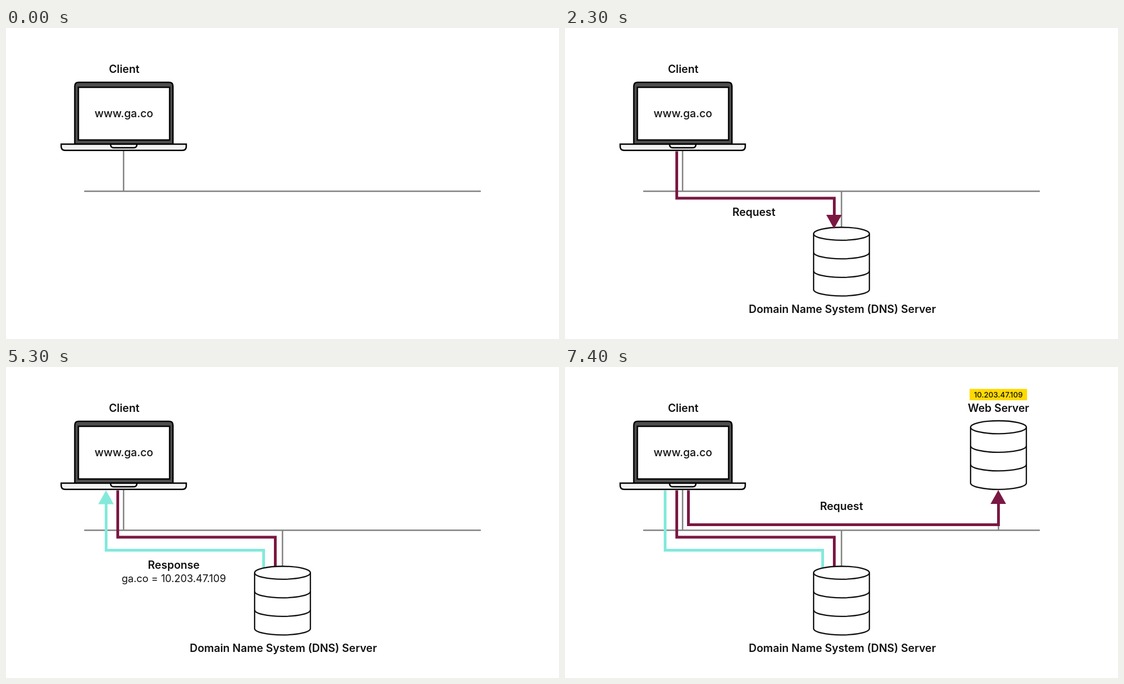
An HTML page that plays this animation: 997 by 561 pixels, repeating every 8 s.

```html
<!DOCTYPE html>
<html lang="en">
<head>
<meta charset="utf-8">
<title>DNS lookup</title>
<style>
  html, body { margin: 0; width: 100%; height: 100%; overflow: hidden; background: #fff; }
  svg { display: block; width: 997px; height: 561px; }

  text { font: 500 19.6px Inter, "Open Sans", sans-serif; text-anchor: middle; fill: #111; }
  .title { font-weight: 600; }
  .wire { fill: none; stroke: #808080; stroke-width: 2.5; }
  .flow { fill: none; stroke-width: 5; }
  .request { stroke: #7a1843; }
  .response { stroke: #84e9db; }
  .request-head { fill: #7a1843; }
  .response-head { fill: #84e9db; }
  .disk { fill: #fff; stroke: #111; stroke-width: 2.3; }
  .laptop { stroke: #000; stroke-width: 2.5; }

  /* Scene changes at 0.5 s, 3.5 s and 6.5 s */
  .ask, .asking, .answer, .answering, .fetch, .asked {
    visibility: hidden;
    animation: 8s step-end infinite;
  }
  .ask { animation-name: ask; }
  .asking { animation-name: asking; }
  .asked, .answer { animation-name: answer; }
  .answering { animation-name: answering; }
  .fetch { animation-name: fetch; }

  @keyframes ask { 0% { visibility: hidden } 6.25%, 100% { visibility: visible } }
  @keyframes asking { 0%, 43.75%, 100% { visibility: hidden } 6.25% { visibility: visible } }
  @keyframes answer { 0% { visibility: hidden } 43.75%, 100% { visibility: visible } }
  @keyframes answering { 0%, 81.25%, 100% { visibility: hidden } 43.75% { visibility: visible } }
  @keyframes fetch { 0% { visibility: hidden } 81.25%, 100% { visibility: visible } }
</style>
</head>
<body>
<svg viewBox="0 0 997 561">
  <defs>
    <g id="disk" class="disk">
      <path d="M-50.3 0V100.5A50.3 11.7 0 0 0 50.3 100.5V0"/>
      <path fill="none" d="M-50.3 33.5A50.3 11.7 0 0 0 50.3 33.5M-50.3 67A50.3 11.7 0 0 0 50.3 67"/>
      <ellipse rx="50.3" ry="11.7"/>
    </g>
    <path id="head" d="M0 0L14 25H-14Z"/>
  </defs>

  <path class="wire" d="M141 294.5H856M212 220V294.5"/>

  <g class="ask">
    <path class="wire" d="M498.5 294.5V362"/>
    <path class="flow request" d="M201.5 222.5V307H485.5V340"/>
  </g>
  <path class="asked flow request" d="M485.5 339V364"/>
  <path class="answer flow response" d="M180.5 245V330.5H464.5V366"/>

  <g class="ask">
    <use href="#disk" x="498.5" y="371.2"/>
    <text class="title" x="500" y="514">Domain Name System (DNS) Server</text>
  </g>

  <g class="asking">
    <use href="#head" class="request-head" transform="translate(485 362) scale(1 -1)"/>
    <text class="title" x="340.5" y="339">Request</text>
  </g>

  <g class="answering">
    <use href="#head" class="response-head" x="180.3" y="222.5"/>
    <text class="title" x="302.5" y="364">Response</text>
    <text x="302.5" y="388" style="font-size:18.4px;font-weight:400">ga.co = 10.203.47.109</text>
  </g>

  <g class="fetch">
    <path class="flow response" d="M180.5 222.5V246"/>
    <path class="wire" d="M781.5 284V294.5"/>
    <path class="flow request" d="M222.5 222.5V284.5H781.5V245"/>
    <use href="#disk" x="781.5" y="108.7"/>
    <use href="#head" class="request-head" x="781.2" y="222"/>
    <text class="title" x="498.5" y="258">Request</text>
    <path fill="#ffd900" d="M729.5 39.5H833V60H729.5Z"/>
    <text x="781.2" y="55" style="font-size:13.5px">10.203.47.109</text>
    <text class="title" x="781.5" y="81">Web Server</text>
  </g>

  <g class="laptop">
    <path fill="#4d4d4d" d="M124 209.5V105Q124 98 131 98H294Q301 98 301 105V209.5Z"/>
    <rect x="130.5" y="107" width="164.5" height="95" fill="#fff"/>
    <path fill="#f2f2f2" d="M99.5 209.5H325V214Q325 220.7 318 220.7H106.500Q99.500 220.700 99.500 214Z"/>
    <path fill="#f2f2f2" d="M188.500 209.500Q188.500 216 194 216H230.500Q236 216 236 209.500Z"/>
  </g>
  <text class="title" x="213" y="81">Client</text>
  <text x="212.500" y="161">www.ga.co</text>
</svg>
</body>
</html>
```
